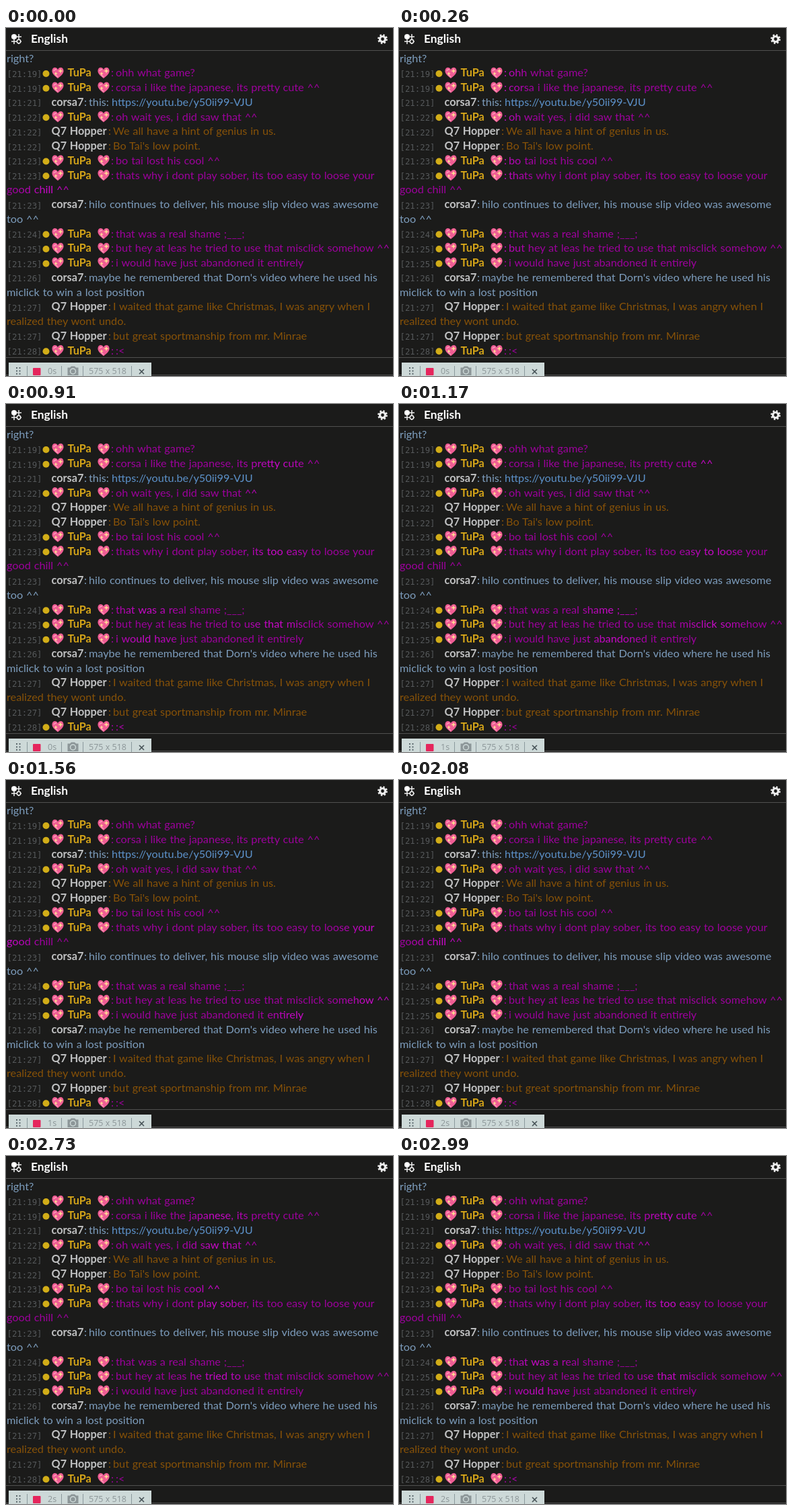
Recreate the animation shown at these times as an HTML page. Size 575 px wide and 518 px high, loop 3120 ms.

```html
<!DOCTYPE html>
<html lang="en">
<head>
<meta charset="utf-8">
<title>Chat</title>
<style>
  html, body { margin: 0; width: 100%; height: 100%; overflow: hidden; background: #1b1b1a; }
  svg { display: block; }
  text { font: 16.25px Lato, sans-serif; word-spacing: .7px; white-space: pre; }
  .name { font-weight: bold; fill: #c0c1c2; }
  .gold { fill: #d5a519; }
  .time { font: 12.35px "DejaVu Sans Mono", monospace; fill: #55585a; }
  .title { font-size: 17.4px; font-weight: bold; fill: #fff; }
  .tool { font: 12.5px "Open Sans", sans-serif; fill: #8c9698; word-spacing: 0; }
</style>
</head>
<body>
<svg width="575" height="518" viewBox="0 0 575 518">
  <defs>
    <g id="heart">
      <path d="M0 8C-4 5-8.6 1-8.6-3C-8.6-9-2-10 0-5C2-10 8.6-9 8.6-3C8.6 1 4 5 0 8Z" fill="#ef5c94"/>
      <path d="M-6-3Q-5-6-2-5M-4 2L0 6" fill="none" stroke="#ffa0bd" stroke-width="1.5"/>
      <path d="M4-7l1 3 3 1-3 1-1 3-1-3-3-1 3-1zM-3-2l.8 2 2 .8-2 .8-.8 2-.8-2-2-.8 2-.8z" fill="#ffd995"/>
    </g>
  </defs>

  <g fill="none" stroke="#eee" stroke-width="1.5">
    <path d="M12 9V24M19 9V24M8 13H23M8 20H23"/>
    <circle cx="12" cy="13" r="3.3" fill="#fff"/>
    <circle cx="19" cy="20" r="2.7" fill="#1b1b1a"/>
    <circle cx="559.5" cy="16.5" r="4" stroke-width="3.2"/>
    <circle cx="559.5" cy="16.5" r="6.2" stroke-width="2.4" stroke-dasharray="2.435"/>
  </g>
  <text class="title" x="37" y="22">English</text>
  <path d="M0 33.5H575M0 490.5H575M0 516.5H575" stroke="#505050"/>

  <g id="chat"></g>

  <path d="M4 498H216V518H4Z" fill="#cdd9d8"/>
  <path d="M16 505V517M20.5 505V517" stroke="#59666a" stroke-width="2" stroke-dasharray="2 2.4"/>
  <path d="M31.5 503V518M82.5 503V518M114.5 503V518M186.5 503V518" stroke="#8b999d"/>
  <rect x="40" y="506" width="11.5" height="11" rx="1" fill="#e5255c"/>
  <text class="tool" id="seconds" x="62" y="514.5">0s</text>
  <path d="M91.5 505.5h3.5l2-2h5l2 2h3.5v11.5H91.5Z" fill="#8c9698"/>
  <circle cx="99.5" cy="511" r="4" fill="#8c9698" stroke="#cdd9d8" stroke-width="1.5"/>
  <text class="tool" x="123" y="514.5">575 x 518</text>
  <path d="M198 508l7 7M205 508l-7 7" stroke="#4b575b" stroke-width="1.7"/>
</svg>
<script>
const NS = "http://www.w3.org/2000/svg";
const LOOP = 3120, STEP = 130, SHINE = 2080, LATE = 520;
const blue = "#7d9dbd", brown = "#875208", link = "#5c91c9";
const base = "#9c009c", bright = "#ca08ca";
const chat = document.getElementById("chat");
const seconds = document.getElementById("seconds");

function add(parent, tag, attrs, text = "") {
  const node = parent.appendChild(document.createElementNS(NS, tag));
  for (const key in attrs) node.setAttribute(key, attrs[key]);
  node.textContent = text;
  return node;
}

// One moving highlight per start delay, plus one for the wrapped line.
const shines = [
  { id: "early", delay: 0, shift: 0 },
  { id: "late", delay: LATE, shift: 0 },
  { id: "wrapped", delay: 0, shift: -545 }
];
for (const shine of shines) {
  shine.node = add(document.querySelector("defs"), "linearGradient",
    { id: shine.id, gradientUnits: "userSpaceOnUse", x1: -58, x2: 58 });
  [base, bright, base].forEach((color, i) =>
    add(shine.node, "stop", { offset: i / 2, "stop-color": color }));
}

const speakers = {
  k: { name: "TuPa", x: 163, gold: true },
  r: { name: "corsa7", x: 123, fill: blue },
  b: { name: "Q7 Hopper", x: 159, fill: brown }
};

const rows = [
  ["", blue, "right?"],
  ["21:19", "k", "ohh what game?"],
  ["21:19", "k", "corsa i like the japanese, its pretty cute ^^"],
  ["21:21", "r", "this: |https://youtu.be/y50ii99-VJU"],
  ["21:22", "k", "oh wait yes, i did saw that ^^"],
  ["21:22", "b", "We all have a hint of genius in us."],
  ["21:22", "b", "Bo Tai's low point."],
  ["21:23", "k", "bo tai lost his cool ^^"],
  ["21:23", "k", "thats why i dont play sober, its too easy to loose your"],
  ["", "url(#wrapped)", "good chill ^^"],
  ["21:23", "r", "hilo continues to deliver, his mouse slip video was awesome"],
  ["", blue, "too ^^"],
  ["21:24", "k", "that was a real shame ;___;", "late"],
  ["21:25", "k", "but hey at leas he tried to use that misclick somehow ^^"],
  ["21:25", "k", "i would have just abandoned it entirely", "late"],
  ["21:26", "r", "maybe he remembered that Dorn's video where he used his"],
  ["", blue, "miclick to win a lost position"],
  ["21:27", "b", "I waited that game like Christmas, I was angry when I"],
  ["", brown, "realized they wont undo."],
  ["21:27", "b", "but great sportmanship from mr. Minrae"],
  ["21:28", "k", ":<", "late"]
];

rows.forEach(([time, who, message, shine = "early"], i) => {
  const y = 50.7 + 21.75 * i;
  if (!time) return add(chat, "text", { x: 1, y, fill: who }, message);

  const { name, x, gold, fill = `url(#${shine})` } = speakers[who];
  add(chat, "text", { class: "time", x: 1.5, y: y + .5 }, `[${time}]`);
  add(chat, "text", { class: gold ? "name gold" : "name", x: gold ? 91.5 : 67.5, y }, name);
  if (gold) {
    add(chat, "circle", { cx: 59.5, cy: y - 4.5, r: 5, fill: "#d2ad18" });
    for (const hx of [77, 145]) add(chat, "use", { href: "#heart", x: hx, y: y - 5.4 });
  }
  add(chat, "text", { x: x - 7, y, fill }, ":");
  const [plain, address] = message.split("|");
  add(chat, "text", { x, y, fill }, plain);
  if (address) add(chat, "text", { x: 157, y, fill: link }, address);
});

function draw(now) {
  const t = Math.floor(now % LOOP / STEP) * STEP;
  for (const { node, delay, shift } of shines) {
    const u = (t - 190 - delay + 2 * SHINE) % SHINE - 100;
    const x = 160 + 560 * (1 - Math.exp(-u / 1100)) + shift;
    node.setAttribute("gradientTransform", `translate(${x})`);
  }
  seconds.textContent = Math.floor(t / 1000) + "s";
}

const start = performance.now();
function tick() {
  draw(performance.now() - start);
  requestAnimationFrame(tick);
}
tick();
</script>
</body>
</html>
```
